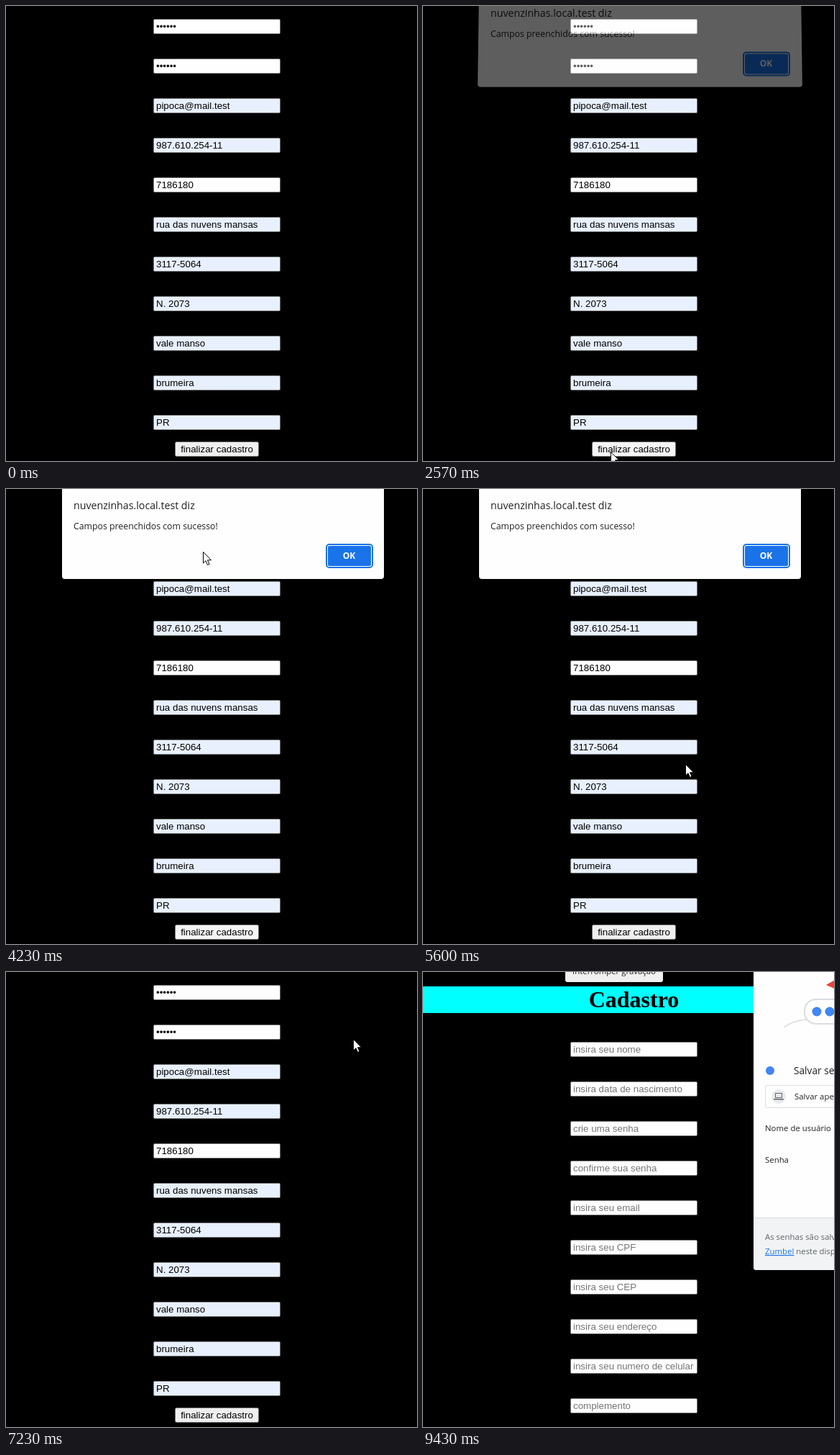
An HTML page that plays this animation: 572x632 px, repeating every 9.46 s.

```html
<!DOCTYPE html>
<html lang="pt-BR">
<head>
<meta charset="utf-8">
<title>Cadastro</title>
<style>
  html, body { margin: 0; width: 100%; height: 100%; overflow: hidden; background: #000; }
  svg { display: block; width: 572px; height: 632px; }
  text { font: 11.4px "Open Sans", "Noto Sans", sans-serif; fill: #202124; white-space: pre; }
  .in { font: 13.333px "Liberation Sans", Arial, sans-serif; fill: #000; }
  .hint { fill: #757575; }
  .head { font: bold 32px "Liberation Serif", "Times New Roman", serif; fill: #000; }
  .title { font-size: 14.2px; }
  .msg { font-size: 12.3px; }
  .big { font-size: 13.7px; }
  .ok { font-size: 12px; font-weight: 700; fill: #fff; }
  .note { fill: #5f6368; }
  .link { fill: #1a73e8; text-decoration: underline; }
</style>
</head>
<body>
<svg id="stage" viewBox="0 0 572 632"></svg>
<script>
const LOOP = 9460;
const WHITE = '#fefefe', FILLED = '#e8f0fe', EDGE = '#767676', LINE = '#dadce0';
const BLUE = '#1a73e8', EYE = '#4285f4', ICON = '#5f6368', BUTTON = '#efefef';

const text = (x, y, s, cls = '', extra = '') =>
  `<text x="${x}" y="${y}" class="${cls}" ${extra}>${s}</text>`;
const rect = (x, y, w, h, fill, extra = '') =>
  `<rect x="${x}" y="${y}" width="${w}" height="${h}" fill="${fill}" ${extra}/>`;
const circle = (x, y, r, fill) => `<circle cx="${x}" cy="${y}" r="${r}" fill="${fill}"/>`;
const path = (d, fill, extra = '') => `<path d="${d}" fill="${fill}" ${extra}/>`;
const stroke = (color, w = 1) => `stroke="${color}" stroke-width="${w}"`;
const group = (id, ...parts) => `<g id="${id}">${parts.join('')}</g>`;
const field = (y, s, fill, cls = '') =>
  rect(205.5, y + .5, 176, 20, fill, `rx="1.5" ${stroke(EDGE)}`) + text(209, y + 15, s, 'in ' + cls);

const values = ['••••••', '••••••', 'pipoca@mail.test', '987.610.254-11', '7186180',
  'rua das nuvens mansas', '3117-5064', 'N. 2073', 'vale manso', 'brumeira', 'PR'];
const typed = [0, 1, 4];
const hints = ['insira seu nome', 'insira data de nascimento', 'crie uma senha',
  'confirme sua senha', 'insira seu email', 'insira seu CPF', 'insira seu CEP',
  'insira seu endereço', 'insira seu numero de celular', 'complemento'];

const filledPage = group('filled',
  ...values.map((s, i) => field(18 + 55 * i, s, typed.includes(i) ? WHITE : FILLED)),
  rect(235.5, 605.5, 116, 20, BUTTON, `id="send" rx="2" ${stroke(EDGE)}`),
  text(293.5, 620, 'finalizar cadastro', 'in', 'text-anchor="middle"'));

const blankPage = group('blank',
  rect(0, 20, 572, 37, '#0ff'),
  text(293.5, 49, 'Cadastro', 'head', 'text-anchor="middle"'),
  ...hints.map((s, i) => field(97 + 55 * i, s, WHITE, 'hint')));

const dialog = group('dialog',
  path('', WHITE, 'id="sheet"'),
  text(94, 28, 'nuvenzinhas.local.test diz', 'title'),
  text(94, 56, 'Campos preenchidos com sucesso!', 'msg'),
  rect(446, 77, 64, 32, WHITE, `rx="4" ${stroke(BLUE, 2)}`),
  rect(448, 79, 60, 28, BLUE, 'id="okFace" rx="2"'),
  text(477.5, 97, 'OK', 'ok', 'id="okText" text-anchor="middle"'));

const address = group('address',
  rect(460, -20, 140, 375, WHITE, 'rx="4"'),
  path('M504 62Q520 48 545 50', 'none', stroke(LINE)),
  path('M510 42L560 34L580 86L517 93Z', '#f1e6a8'),
  rect(523, 74, 17, 10, '#fbbc04', 'rx="5" transform="rotate(-20 531 79)"'),
  text(476, 136, 'Salvar endereço?', 'big'),
  path('M484 168C478 160 479 154 484 154S490 160 484 168Z', ICON),
  circle(484, 159, 1.8, WHITE),
  ...['pessoa da vila', 'rua das nuvens', 'brumeira-PR', '7186180', 'Brasil']
    .map((s, i) => text(508, 165 + 20 * i, s)),
  rect(477, 268, 14, 11, ICON, 'rx="1"'),
  path('M478 270L484 274.5L490 270', 'none', stroke(WHITE)),
  text(508, 277, 'pipoca@mail.test'));

const password = group('password',
  rect(460, -20, 150, 434, WHITE, 'rx="4"'),
  path('M460 341H610V414H464Q460 414 460 410Z', '#f1f3f4'),
  path('M460 341.5H610', 'none', stroke(LINE)),
  path('M502 77Q520 64 546 66T590 78', 'none', stroke(LINE, 1.5)),
  rect(531, 38, 70, 34, WHITE, `rx="16" ${stroke(LINE, 2)}`),
  circle(548, 55, 6.5, EYE), circle(566, 55, 6.5, EYE),
  path('M561 18L575 10V24Z', '#ea4335'),
  circle(483, 137, 6, EYE),
  text(516, 142, 'Salvar senha?', 'big'),
  rect(476.5, 157.5, 130, 31, WHITE, `rx="2" ${stroke(LINE)}`),
  circle(495, 173, 10, '#e8eaed'),
  rect(490.5, 168.5, 9, 6, 'none', stroke(ICON)),
  rect(488, 176, 14, 1.5, ICON),
  text(517, 177, 'Salvar apenas aqui'),
  text(476, 221, 'Nome de usuário'),
  text(476, 265, 'Senha'),
  text(476, 372, 'As senhas são salvas', 'note'),
  text(476, 392, '<tspan class="link">Zumbel</tspan> neste dispositivo', 'note'));

const tip = group('tip',
  rect(198, -20, 136, 34, '#f0f0f0', 'rx="3"'),
  text(266, 3, 'Interromper gravação', '', 'text-anchor="middle"'));

const cursor = group('cursor',
  path('M.5 .5V16L4 12.7L6.5 18.5L9 17.4L6.5 11.8H11.5Z', '#fff', stroke('#000')));

document.getElementById('stage').innerHTML =
  rect(0, 0, 572, 632, '#000') + filledPage + blankPage + dialog + address + password + tip + cursor;

const el = Object.fromEntries(['filled', 'blank', 'send', 'dialog', 'sheet', 'okFace', 'okText',
  'address', 'password', 'tip', 'cursor'].map(id => [id, document.getElementById(id)]));

// time, x, y of the pointer tip
const route = [
  [0, 600, -5], [100, 565, 8], [400, 430, 330], [700, 320, 608], [980, 300, 540],
  [1230, 303, 295], [1480, 290, 84], [1760, 215, 350], [2150, 261, 619], [2850, 261, 619],
  [3250, 360, 300], [3600, 480, 50], [3900, 280, 70], [4230, 274, 87], [4800, 270, 130],
  [5350, 330, 394], [5850, 400, 370], [6250, 465, 220], [6600, 476, 91], [7100, 476, 91],
  [7800, 550, 115], [8170, 570, 133], [8350, 590, 250], [8740, 553, 588], [9000, 440, 320],
  [9200, 280, 60], [9300, 255, -25], [LOOP, 255, -25]
];

const clamp = v => Math.min(1, Math.max(0, v));
const easeOut = v => 1 - (1 - clamp(v)) ** 2;
const show = (node, alpha) => {
  node.style.display = alpha > 0 ? '' : 'none';
  node.setAttribute('opacity', alpha);
};

function pointer(t) {
  const i = Math.max(1, route.findIndex(p => p[0] >= t));
  const [t0, x0, y0] = route[i - 1], [t1, x1, y1] = route[i];
  const k = clamp((t - t0) / (t1 - t0)), s = k * k * (3 - 2 * k);
  return [x0 + (x1 - x0) * s, y0 + (y1 - y0) * s];
}

function draw(t) {
  const fresh = t >= 7800;
  show(el.filled, fresh ? 0 : 1);
  show(el.blank, fresh ? 1 : 0);
  el.send.setAttribute('fill', t > 2050 && t < 4500 ? '#f5f5f5' : BUTTON);

  const open = easeOut((t - 2536) / 170) * (1 - easeOut((t - 7000) / 140));
  const lean = 3 * (1 - open);
  show(el.dialog, open);
  el.dialog.setAttribute('transform', `translate(0 ${-20 * (1 - open)})`);
  el.sheet.setAttribute('d', `M78 -10H526L${526 + lean} 121Q${526 + lean} 125 ${522 + lean} 125` +
    `H${82 - lean}Q${78 - lean} 125 ${78 - lean} 121Z`);
  const hover = t > 6520;
  el.okFace.setAttribute('fill', hover ? '#4a8fe8' : BLUE);
  el.okText.style.fill = hover ? '#e8eef8' : '';

  const pass = easeOut((t - 8130) / 170);
  show(el.address, pass < 1 ? easeOut((t - 7450) / 170) : 0);
  show(el.password, pass);
  el.password.setAttribute('transform',
    `translate(590 229) scale(${.954 + .046 * pass}) translate(-590 -229)`);

  show(el.tip, t >= 9370 ? 1 : 0);
  el.cursor.setAttribute('transform', `translate(${pointer(t).map(Math.round)})`);
}

const start = performance.now();
function tick() {
  draw((performance.now() - start) % LOOP);
  requestAnimationFrame(tick);
}
tick();
</script>
</body>
</html>
```
